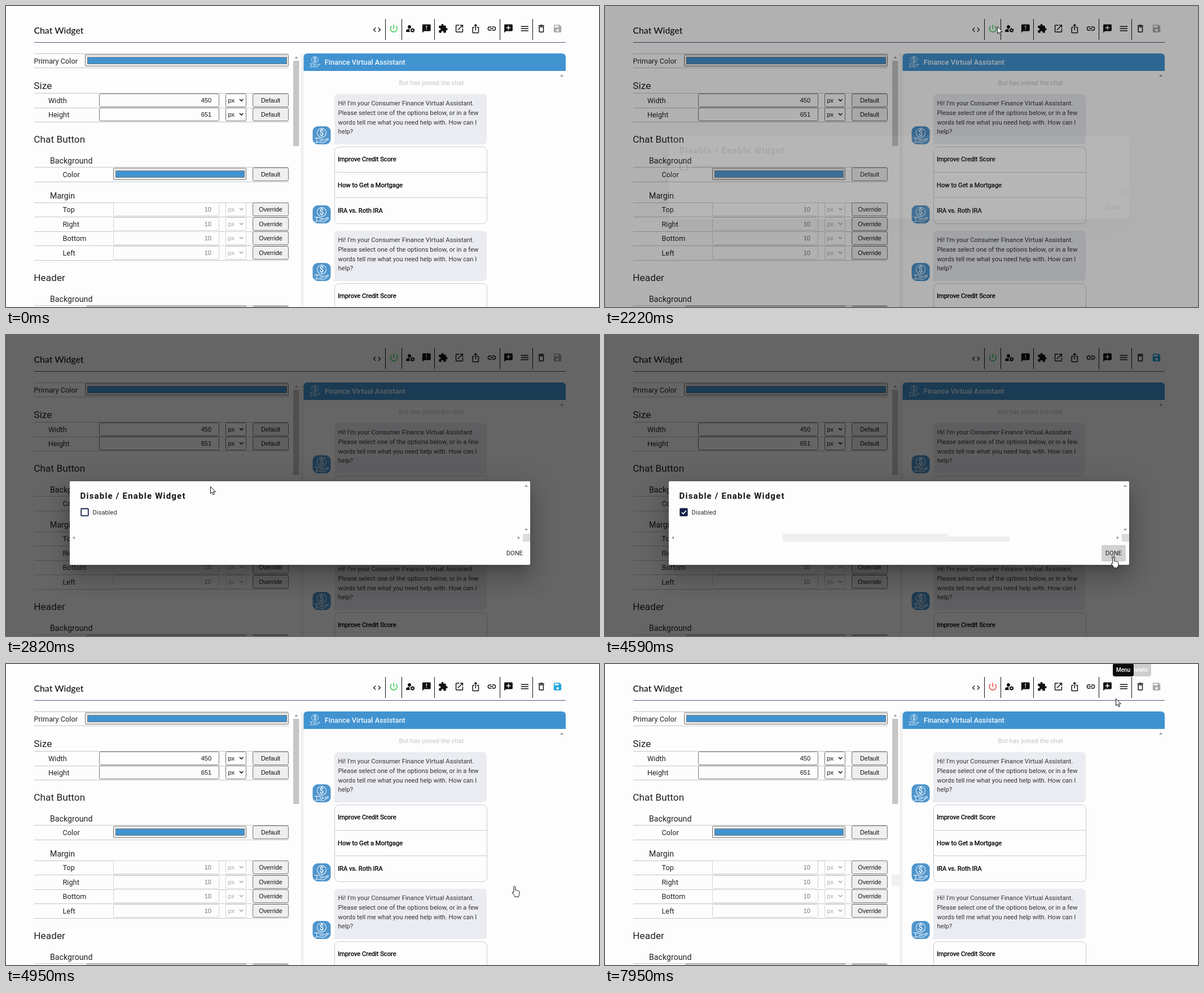
Animation, 1051 px wide and 533 px high, one loop 8 s. Source, as an HTML page:

```html
<!DOCTYPE html>
<html lang="en">
<head>
<meta charset="utf-8">
<title>Chat Widget settings</title>
<style>
  html, body { margin: 0; width: 100%; height: 100%; overflow: hidden; background: #fdfdfd; }
  svg, #shade { position: absolute; left: 0; top: 0; }
  #shade { width: 1051px; height: 533px; background: #000; }
  #dialog {
    position: absolute; left: 113px; top: 259px; width: 816px; height: 148px;
    background: #fdfdfd; border-radius: 2px;
    box-shadow: 0 11px 15px -7px #0003, 0 24px 38px 3px #00000024, 0 9px 46px 8px #0000001f;
  }
  text { font-family: Roboto, sans-serif; white-space: pre; }
  .arial { font-family: "Liberation Sans", Arial, sans-serif; }
  .title { font-family: Lato, sans-serif; font-weight: 500; }
  .medium { font-weight: 500; }
  .heavy { font-weight: 700; letter-spacing: 1.2px; }
  .option { stroke: #000; stroke-width: .35px; }
</style>
</head>
<body>
<svg id="page" width="1051" height="533"></svg>
<div id="shade"></div>
<div id="dialog"><svg id="form" width="816" height="148"></svg></div>
<svg id="pointer" width="1051" height="533">
  <g id="cursor" fill="#fff" stroke="#111" stroke-linejoin="round">
    <path id="arrow" d="M.5 .5V13L3.4 10.3L5.4 14.9L7.4 14L5.4 9.6H9.4Z"/>
    <path id="hand" d="M-1.7 10.5V1.2a1.5 1.5 0 0 1 3 0V6.5q2.5-.8 2.9.7q2.1-.5 2.5.8q1.8 0 1.8 1.6v3.2q0 2-1.4 4v1.4h-7v-1.4q-2.5-2.5-4.4-6q.8-1.8 2.6-.3z"/>
  </g>
</svg>
<script>
const $ = id => document.getElementById(id);
const BLUE = '#4193d0', EDGE = '#767676';

const text = (s, x, y, size, fill = '#222', cls = '', anchor = 'start') =>
  `<text x="${x}" y="${y}" font-size="${size}" fill="${fill}" class="${cls}" text-anchor="${anchor}">${s}</text>`;
const rect = (x, y, w, h, fill, stroke = 'none', r = 0, extra = '') =>
  `<rect x="${x}" y="${y}" width="${w}" height="${h}" rx="${r}" fill="${fill}" stroke="${stroke}" ${extra}/>`;
const path = (d, fill, extra = '') => `<path d="${d}" fill="${fill}" fill-rule="evenodd" ${extra}/>`;
const rule = (y, x1 = 50, x2 = 501, color = '#c4c4c4') => rect(x1, y, x2 - x1, 1, color);
const triangle = (x, y, turn) => path('M-3 2L0-2L3 2Z', '#a0a0a0', `transform="translate(${x} ${y}) rotate(${turn})"`);

// ---- toolbar
const BUBBLE = 'M20 2H4c-1.1 0-2 .9-2 2V22l4-4h14c1.1 0 2-.9 2-2V4c0-1.1-.9-2-2-2z';
const icon = (x, y, d, fill = '#111', id = '', size = .74) =>
  path(d, fill, `id="${id}" transform="translate(${x} ${y}) scale(${size}) translate(-12 -12)"`);

function toolbar() {
  const dividers = [673, 702, 760, 876, 934].map(x => rect(x - 1, 23, 1, 37, '#111')).join('');
  return text('Chat Widget', 49.5, 49, 15.8, '#111', 'title') + rule(64, 50, 992, '#4d5a7d') + dividers +
    icon(657.5, 42, 'M9.4 16.6L4.8 12l4.6-4.6L8 6l-6 6 6 6zm5.2 0l4.6-4.6-4.6-4.6L16 6l6 6-6 6z', '#111', '', .68) +
    icon(687.3, 40, 'M13 3h-2v10h2zm4.83 2.17l-1.42 1.42C17.99 7.86 19 9.81 19 12c0 3.87-3.13 7-7 7s-7-3.13-7-7c0-2.19 1.01-4.14 2.58-5.42L6.17 5.17C4.23 6.82 3 9.26 3 12c0 4.97 4.03 9 9 9s9-4.03 9-9c0-2.74-1.23-5.18-3.17-6.83z', '', 'power') +
    icon(716.5, 40, 'M10 4a4 4 0 0 0 0 8a4 4 0 0 0 0-8zM10.7 13C7.5 12.8 5 13.8 3.4 14.8Q2 15.8 2 17.4V20h9.3Q9 16.6 10.7 13z') +
    `<circle cx="720.5" cy="43" r="2.2" fill="none" stroke="#111" stroke-width="1.8"/>
     <circle cx="720.5" cy="43" r="3.4" fill="none" stroke="#111" stroke-width="1.2" stroke-dasharray="1.78"/>` +
    icon(745.3, 40, BUBBLE + 'M13 14h-2v-2h2zm0-4h-2V5h2z') +
    icon(774.7, 40, 'M20.5 11H19V7c0-1.1-.9-2-2-2h-4V3.5C13 2.12 11.88 1 10.5 1S8 2.12 8 3.5V5H4c-1.1 0-2 .9-2 2v3.8h1.5c1.49 0 2.7 1.21 2.7 2.7s-1.21 2.7-2.7 2.7H2V20c0 1.1.9 2 2 2h3.8v-1.5c0-1.49 1.21-2.7 2.7-2.7s2.7 1.21 2.7 2.7V22H17c1.1 0 2-.9 2-2v-4h1.5c1.38 0 2.5-1.12 2.5-2.5S21.88 11 20.5 11z') +
    icon(803.5, 40, 'M19 19H5V5h7V3H5c-1.1 0-2 .9-2 2v14c0 1.1.9 2 2 2h14c1.1 0 2-.9 2-2v-7h-2zM14 3v2h3.6L7.8 14.8l1.4 1.4L19 6.4V10h2V3z') +
    icon(832.3, 40, 'M16 5l-1.4 1.4L13 4.8V16h-2V4.8L9.4 6.4 8 5l4-4zm4 5v11c0 1.1-.9 2-2 2H6c-1.1 0-2-.9-2-2V10c0-1.1.9-2 2-2h3v2H6v11h12V10h-3V8h3c1.1 0 2 .9 2 2z') +
    icon(861, 40, 'M3.9 12c0-1.7 1.4-3.1 3.1-3.1h4V7H7a5 5 0 0 0 0 10h4v-1.9H7c-1.7 0-3.1-1.4-3.1-3.1zM8 13h8v-2H8zm9-6h-4v1.9h4a3.1 3.1 0 0 1 0 6.2h-4V17h4a5 5 0 0 0 0-10z') +
    icon(890.5, 40, BUBBLE + 'M17 11h-4v4h-2v-4H7V9h4V5h2v4h4z') +
    icon(919.3, 40, 'M3 18h18v-2H3zm0-5h18v-2H3zm0-7v2h18V6z') +
    icon(948.8, 40, 'M16 9v10H8V9zM14.5 3h-5l-1 1H5v2h14V4h-3.5zM18 7H6v12c0 1.1.9 2 2 2h8c1.1 0 2-.9 2-2z') +
    icon(977.5, 40, 'M17 3H5c-1.1 0-2 .9-2 2v14c0 1.1.9 2 2 2h14c1.1 0 2-.9 2-2V7zM12 19a3 3 0 0 1 0-6a3 3 0 0 1 0 6zM15 9H5V5h10z', '', 'save');
}

// ---- settings panel
const heading = (s, y) => text(s, 49.3, y, 17.3);
const subheading = (s, y) => text(s, 78, y, 14.2);
const label = (s, x, y) => text(s, x, y, 12.75);

const swatch = (x, right, y) =>
  rect(x + .5, y + .2, right - x - 1, 20.3, '#efefef', EDGE, 1.5) +
  rect(x + 4.5, y + 4.8, right - x - 8, 11.7, BLUE, '#777');

const button = (s, y) => rect(437.5, y - 11.5, 63, 23, '#efefef', EDGE, 2.5) +
  text(s, 469, y + 4, 10.8, '#111', 'arial', 'middle');

function numberRow(name, y, value, x, labelX, enabled) {
  const edge = enabled ? EDGE : '#d2d2d2', ink = enabled ? '#111' : '#aaa';
  return label(name, labelX, y + 4.5) +
    rect(x + .5, y - 11.5, 378 - x - 1, 23, '#fdfdfd', edge, 2) +
    text(value, 364, y + 4, 11, enabled ? '#111' : '#777', 'arial', 'end') +
    rect(389.5, y - 11.5, 36, 23, '#fdfdfd', edge, 2) +
    text('px', 393.5, y + 4, 11, ink, 'arial') +
    path(`M414 ${y - 2}l3.2 3.2l3.2-3.2`, 'none', `stroke="${ink}" stroke-width="1.6"`) +
    button(enabled ? 'Default' : 'Override', y);
}

function settings() {
  const rules = [84, 109, 154, 180, 205, 285, 311, 348, 373, 399, 424, 450, 530].map(y => rule(y)).join('');
  const margins = ['Top', 'Right', 'Bottom', 'Left']
    .map((name, i) => numberRow(name, Math.round(360 + 25.5 * i), 10, 190, 100.5, false)).join('');
  return rules + label('Primary Color', 49.5, 101.5) + swatch(140, 501, 86) +
    heading('Size', 147) + numberRow('Width', 167, 450, 165, 75, true) + numberRow('Height', 192, 651, 165, 75, true) +
    heading('Chat Button', 242) + subheading('Background', 278.5) +
    label('Color', 100.5, 302.5) + swatch(190, 426, 287) + button('Default', 298) +
    subheading('Margin', 341) + margins +
    heading('Header', 487) + subheading('Background', 523.5) + swatch(143, 426, 531) + button('Default', 543) +
    triangle(514.5, 91, 0) + rect(509, 97, 10.5, 151, '#c6c6c6') + rect(522.5, 84, 5, 449, '#f0f0f0');
}

// ---- chat preview
const coinHand = (x, y, scale) => `<g transform="translate(${x} ${y}) scale(${scale})" fill="none" stroke="#e4eff8" stroke-width="1.2">
  <circle cy="-4.5" r="8.2"/><g stroke="none">${text('$', 0, .3, 14, '#f4f9fd', 'medium', 'middle')}</g>
  <path d="M-13 5h4v8h-4M-9 6q4-2 7 1h4q2 2-1 3h-5M4 9l6-3q3-.5 2 1.5l-8 5.5q-2 1-5 0l-8-1"/></g>`;

const avatar = y => rect(543.5, y - 16, 32, 32, '#4f95cc', 'none', 9) + coinHand(559.5, y, .98);

function message(y) {
  const lines = ['Hi! I’m your Consumer Finance Virtual Assistant.', 'Please select one of the options below, or in a few',
    'words tell me what you need help with. How can I', 'help?'];
  const options = ['Improve Credit Score', 'How to Get a Mortgage', 'IRA vs. Roth IRA'];
  return path(`M589 ${y}H845q7 0 7 7v75q0 7-7 7H579q3-2 3-7V${y + 7}q0-7 7-7z`, '#ebecf1') +
    lines.map((s, i) => text(s, 588.5, y + 20 + 16.8 * i, 11.25, '#333')).join('') + avatar(y + 73) +
    rect(582.5, y + 93.5, 270, 136, '#fdfdfd', '#c9cbd0', 8) +
    rule(y + 138, 583, 852, '#c9cbd0') + rule(y + 183, 583, 852, '#c9cbd0') +
    options.map((s, i) => text(s, 588, y + 119 + 45.5 * i, 11.15, '#000', 'option')).join('') + avatar(y + 213);
}

const preview = () =>
  path('M527.5 115V91q0-7 7-7H985q7 0 7 7v24z', BLUE) + coinHand(547.5, 98.5, .72) +
  text('Finance Virtual Assistant', 564.7, 104, 12.75, '#eef6fc', 'medium') +
  text('Bot has joined the chat', 754, 140, 11.3, '#c3c3c3', '', 'middle') +
  triangle(985, 123, 0) + message(156) + message(398);

// ---- timed parts: tooltips [label, x, width, start, end], scrollbar pieces [x, y, w, h, start, end]
const tooltips = [
  ['Delete', 948, 40, 740, 860], ['Menu', 918.5, 37, 830, 960],
  ['Disable / Enable Widget', 687, 114, 1440, 2070],
  ['Delete', 948, 40, 7770, 7870], ['Menu', 918.5, 37, 7850, 8100]
];
const tracks = [[1031, 41, 20, 16, 560, 2100], [508, 373, 15, 20, 7200, 8000]];

$('page').innerHTML = rect(0, 0, 1051, 533, '#fdfdfd') +
  tracks.map(([x, y, w, h], i) => rect(x, y, w, h, '#f0f0f0', 'none', 0, `id="track${i}"`)).join('') +
  toolbar() + settings() + preview() +
  tooltips.map(([s, x, w], i) => `<g id="tip${i}">${rect(x - w / 2, -1, w, 23, '#0c0c0c', 'none', 4)}${
    text(s, x, 13.5, 10, '#fff', 'medium', 'middle')}</g>`).join('');

$('form').innerHTML = `<g transform="translate(-113 -259)">` +
  text('Disable / Enable Widget', 131.5, 290.3, 15, '#111', 'heavy') +
  rect(133.2, 307.5, 12.6, 12.6, 'none', '#14234b', 1, 'id="box" stroke-width="1.8"') +
  path('M136 314l2.7 2.8l5-5.8', 'none', 'id="tick" stroke="#fff" stroke-width="1.7"') +
  text('Disabled', 153.6, 317.5, 11.2, '#333') +
  triangle(922, 267, 0) + triangle(922, 345, 180) + triangle(120, 359, 270) + triangle(909, 359, 90) +
  rect(916, 352, 13, 14, '#dcdcdc') +
  `<g id="scroll">${path('M315 352H608V357H717V366H315z', '#efefef')}</g>` +
  rect(880, 372, 43, 29, '#d1d1d1', 'none', 2, 'id="hover"') +
  `<circle id="ripple" cx="901" cy="394" fill="#000" fill-opacity=".25"/>` +
  text('DONE', 901.3, 389.7, 11.1, '#222', '', 'middle') + '</g>';

// ---- motion
const LOOP = 8000;
const route = [
  [500, 1051, 48], [1280, 775, 42], [1500, 697, 37], [1760, 695, 36], [2250, 695, 36], [2820, 362, 268],
  [3210, 211, 310], [3420, 211, 310], [4080, 787, 372], [4440, 901.5, 394], [5100, 901.5, 394],
  [5940, 1000, 45], [6120, 979, 39], [6400, 979, 39], [7200, 424, 357], [7260, 424, 357],
  [7530, 976, 45], [7710, 976, 45], [7950, 905, 61]
];
const handTimes = [[1440, 2130], [3120, 3540], [4290, 5220], [6060, 6540]];

const clamp = v => Math.min(1, Math.max(0, v));
const ramp = (t, from, to) => clamp((t - from) / (to - from));
const smooth = v => v * v * (3 - 2 * v);
const within = (t, from, to) => t >= from && t < to;
const show = (id, on) => $(id).style.display = on ? '' : 'none';

function cursorAt(t) {
  const next = route.findIndex(p => p[0] > t);
  if (next < 1) return next ? route.at(-1).slice(1) : route[0].slice(1);
  const [t0, x0, y0] = route[next - 1], [t1, x1, y1] = route[next];
  const k = smooth(ramp(t, t0, t1));
  return [x0 + (x1 - x0) * k, y0 + (y1 - y0) * k];
}

function draw(t) {
  $('power').setAttribute('fill', t < 7290 ? '#3bc653' : '#e8453c');
  $('save').setAttribute('fill', within(t, 3360, 7290) ? '#1ea5dd' : '#a8a8a8');
  tooltips.forEach(([, , , from, to], i) =>
    $('tip' + i).style.opacity = ramp(t, from, from + 80) * (1 - ramp(t, to, to + 100)));
  tracks.forEach(([, , , , from, to], i) => show('track' + i, within(t, from, to)));

  const leaving = ramp(t, 4620, 4900);
  $('shade').style.opacity = .6 * ramp(t, 2070, 2370) * (1 - leaving);
  const entering = ramp(t, 2205, 2460);
  $('dialog').style.opacity = entering * (1 - leaving);
  $('dialog').style.transform = `translateY(${-30 * (1 - smooth(entering) + smooth(leaving))}px)`;

  const checked = t >= 3360;
  $('box').setAttribute('fill', checked ? '#14234b' : 'none');
  show('tick', checked);
  show('scroll', t >= 3800);
  show('hover', t >= 4260);
  $('ripple').setAttribute('r', t < 4560 ? 0 : 2.5 + 14 * ramp(t, 4560, 4900));

  const [x, y] = cursorAt(t);
  const hand = handTimes.some(([from, to]) => within(t, from, to));
  $('cursor').setAttribute('transform', `translate(${x} ${y})`);
  show('cursor', t > 500);
  show('hand', hand);
  show('arrow', !hand);
}

const start = performance.now();
function frame() {
  draw((performance.now() - start) % LOOP);
  requestAnimationFrame(frame);
}
frame();
</script>
</body>
</html>
```
